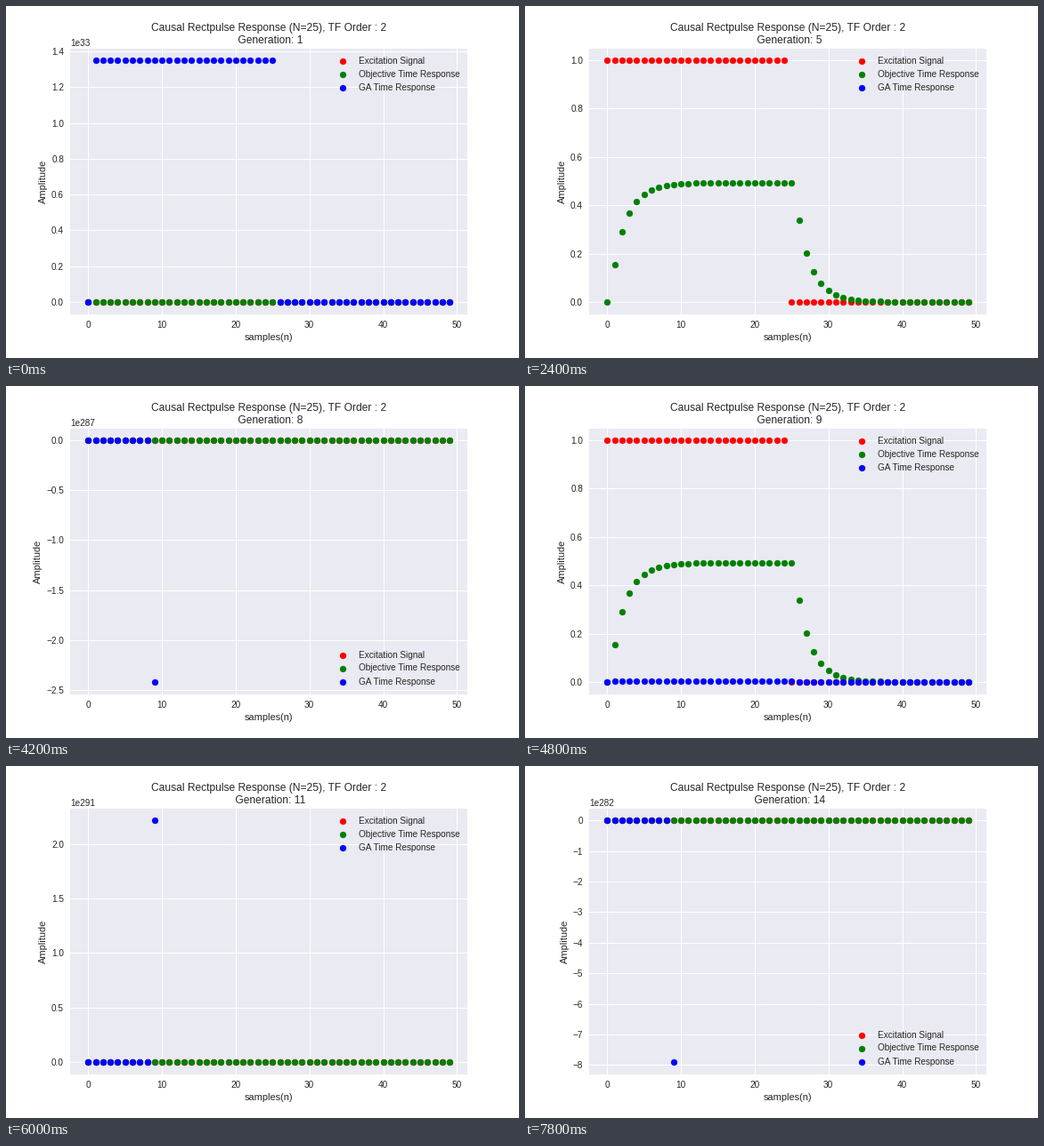
A matplotlib script for the animation above (8 s loop, 576 by 396 pixels).

```python
import numpy as np
import matplotlib.pyplot as plt
from matplotlib.animation import FuncAnimation

plt.style.use("seaborn-v0_8")
plt.rcParams.update({
    "font.family": "Liberation Sans",
    "figure.subplot.left": 0.125,
    "figure.subplot.right": 0.9,
    "figure.subplot.bottom": 0.125,
    "figure.subplot.top": 0.88,
})

SAMPLES = 50
PULSE = 25
INTERVAL = 200
FRAMES = 40
FRAMES_PER_GENERATION = 3

n = np.arange(SAMPLES)
excitation = (n < PULSE).astype(float)


def step_error(k):
    """Distance of the step response from its final value after k samples."""
    tail = 0.203 * 0.616 ** (k - 2.0)
    return np.where(k <= 0, 0.493, np.where(k == 1, 0.3375, tail))


objective = np.where(n <= PULSE, 0.493 - step_error(n), step_error(n - PULSE))


def pulse(level):
    """Delayed rectangular response."""
    return np.where((n >= 1) & (n <= PULSE), level, 0.0)


def diverging(peak):
    """Response that explodes at sample 9 and overflows afterwards."""
    y = np.full(SAMPLES, np.nan)
    y[:9] = 0
    y[9] = peak
    return y


responses = [
    pulse(1.35e33),
    diverging(2.837e297),
    diverging(2.837e297),
    pulse(2.3e30),
    np.full(SAMPLES, np.nan),
    diverging(-1.903e288),
    diverging(-1.903e288),
    diverging(-2.42e287),
    pulse(0.004),
    diverging(-3.3e285),
    diverging(2.22e291),
    diverging(3.09e288),
    diverging(6.2e285),
    diverging(-7.9e282),
]

fig, ax = plt.subplots(figsize=(8, 5.5), dpi=72)


def draw(frame):
    generation = frame // FRAMES_PER_GENERATION + 1
    ax.clear()
    ax.scatter(n, excitation, c="r", label="Excitation Signal")
    ax.scatter(n, objective, c="g", label="Objective Time Response")
    ax.scatter(n, responses[generation - 1], c="b", label="GA Time Response")
    ax.set_title("Causal Rectpulse Response (N=25), TF Order : 2\n"
                 f" Generation: {generation}")
    ax.set_xlabel("samples(n)")
    ax.set_ylabel("Amplitude")
    ax.legend(loc="lower right" if generation in (6, 7, 8, 10, 14)
              else "upper right")
    return ax.collections


anim = FuncAnimation(fig, draw, frames=FRAMES, interval=INTERVAL,
                     repeat=True, repeat_delay=0, blit=False)
plt.show()
```
